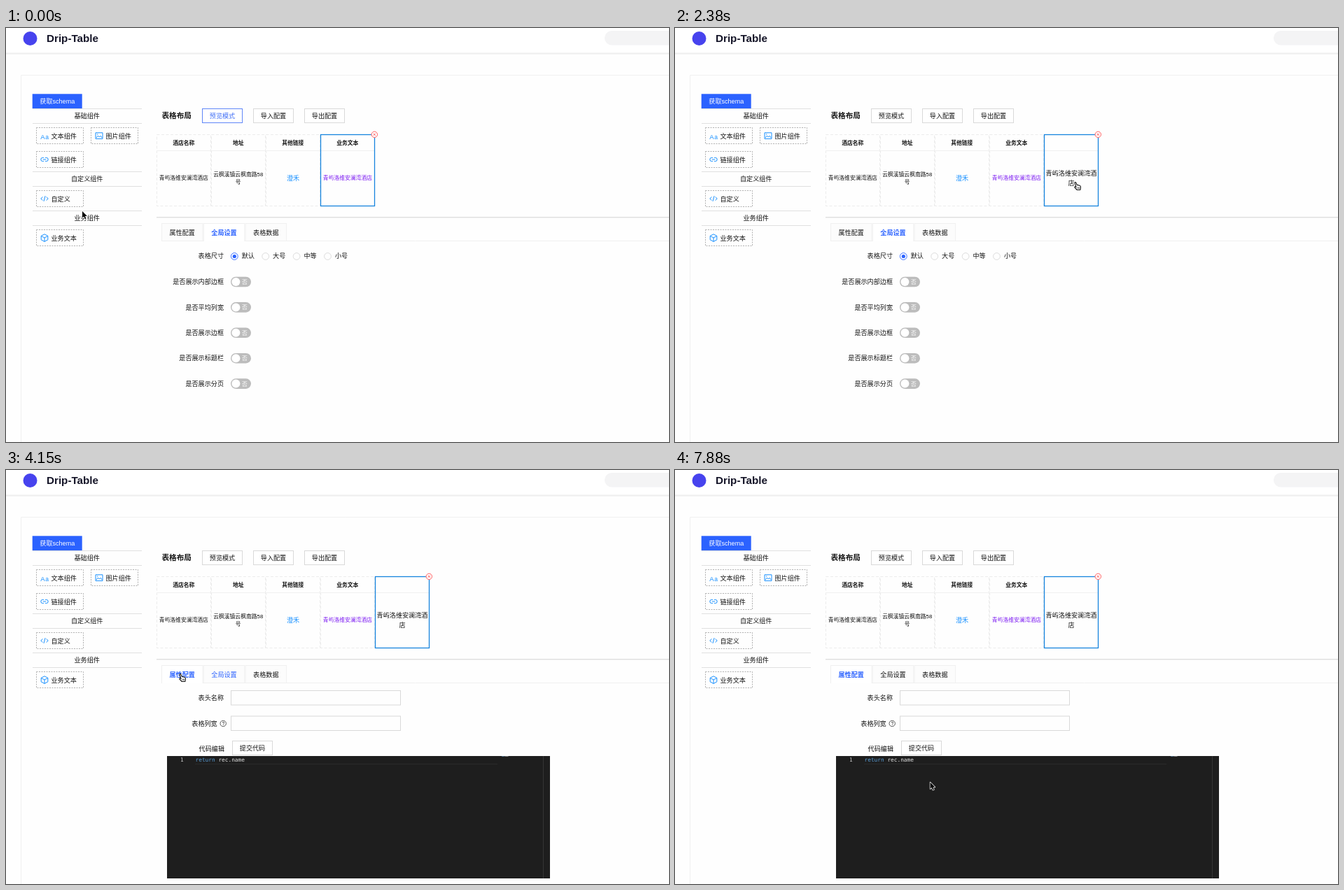
Animation of 947x592 px, one loop 8000 ms. Source, as an HTML page with a canvas:

```html
<!DOCTYPE html>
<html lang="zh-CN">
<head>
<meta charset="utf-8">
<title>Drip-Table</title>
<style>
html, body { margin: 0; width: 100%; height: 100%; overflow: hidden; background: #fff; }
canvas { display: block; width: 947px; height: 592px; }
</style>
</head>
<body>
<canvas id="stage"></canvas>
<script>
const W = 947, H = 592, LOOP = 8000;
const SANS = '"Liberation Sans", "Noto Sans CJK SC", "Noto Sans CJK", sans-serif';
const MONO = '"DejaVu Sans Mono", monospace';
const INK = '#141414', BLUE = '#2b62ff', SKY = '#1890ff', LINE = '#d9d9d9', PALE = '#ececec';
const HOTEL = '青屿洛维安澜湾酒店';

// When the interface changes state
const ADDED = 1040, SELECTED = 2380, HOVER = 4000, SWITCHED = 4150, SETTLED = 4300;

// Pointer stops: time, x, y, kind
const pointer = [
  [0, 109, 262, 'arrow'], [150, 86, 242, 'hand'],
  [1040, 106, 245, 'hand'], [1190, 235, 246, 'arrow'], [1330, 430, 240, 'hand'],
  [1480, 592, 230, 'hand'], [1630, 652, 225, 'arrow'], [1780, 570, 220, 'hand'],
  [2830, 546, 258, 'arrow'], [2980, 474, 322, 'arrow'], [3120, 407.5, 353.5, 'arrow'],
  [3270, 372, 349, 'arrow'], [3410, 334, 336, 'arrow'], [3560, 296, 317, 'arrow'],
  [3710, 264, 300, 'arrow'], [3860, 245, 292, 'hand'], [4000, 247, 291, 'hand'],
  [4300, 275, 332, 'arrow'], [4440, 334, 440, 'arrow'], [4590, 0, 0, 'none'],
  [7290, 349.5, 477.5, 'arrow'], [7590, 353, 470, 'arrow'],
  [7740, 361, 456, 'arrow'], [7880, 364.5, 446.5, 'arrow']
];
const arrow = new Path2D('M0 0V9.6L2.2 7.6 3.8 11.2 5.4 10.5 3.9 7H6.9Z');
const hand = new Path2D('M1 1.6C.8 .6 2.2 .1 2.7 1L4.3 4.4 8 5.2C9.3 5.6 9.6 6.6 9.4 8L8.9 11.5H4.2L1 8.2C.2 7.2 1.4 6.3 2.2 7L3 7.6Z');

const canvas = document.getElementById('stage');
const c = canvas.getContext('2d');
const dpr = window.devicePixelRatio || 1;
canvas.width = W * dpr;
canvas.height = H * dpr;

// Text is placed by its vertical middle
function text(s, x, y, { size = 9.1, color = INK, bold = false, align = 'center', font = SANS } = {}) {
  c.font = `${bold ? 'bold ' : ''}${size}px ${font}`;
  c.textAlign = align;
  c.fillStyle = color;
  c.fillText(s, x, y + size * 0.38);
}

function fill(x, y, w, h, color) {
  c.fillStyle = color;
  c.fillRect(x, y, w, h);
}

function box(x, y, w, h, color, dash = [], width = 1) {
  c.setLineDash(dash);
  c.lineWidth = width;
  c.strokeStyle = color;
  c.strokeRect(x, y, w, h);
  c.setLineDash([]);
}

function line(x1, y1, x2, y2, color, width = 1) {
  c.lineWidth = width;
  c.strokeStyle = color;
  c.beginPath();
  c.moveTo(x1, y1);
  c.lineTo(x2, y2);
  c.stroke();
}

function disc(x, y, r, color, ring) {
  c.beginPath();
  c.arc(x, y, r, 0, Math.PI * 2);
  if (ring) {
    c.lineWidth = ring;
    c.strokeStyle = color;
    c.stroke();
  } else {
    c.fillStyle = color;
    c.fill();
  }
}

function pill(x, y, w, h, color) {
  c.beginPath();
  c.roundRect(x, y, w, h, h / 2);
  c.fillStyle = color;
  c.fill();
}

function shape(d, x, y) {
  c.save();
  c.translate(x, y);
  c.lineWidth = 1;
  c.strokeStyle = SKY;
  c.stroke(new Path2D(d));
  c.restore();
}

function button(label, x, y, on) {
  fill(x, y, 57, 20, '#fff');
  box(x, y, 57, 20, on ? '#5f86f8' : LINE);
  text(label, x + 28.5, y + 10, { color: on ? '#3f6ef6' : INK });
}

function header() {
  fill(0, 0, W, 36, '#fff');
  fill(0, 35, W, 1, '#f5f5f5');
  fill(0, 36, W, 1, '#eeeeee');
  fill(0, 37, W, 1, '#f6f6f6');
  disc(34.5, 15, 10, '#4743ee');
  text('Drip-Table', 58, 14.5, { size: 15.2, bold: true, color: '#151528', align: 'left' });
  pill(855, 4, 120, 20.5, '#f4f4f5');
  line(21.5, 67.5, W, 67.5, '#f0f0f0');
  line(21.5, 67.5, 21.5, H, '#f0f0f0');
}

function part(label, x, y, icon) {
  box(x + 0.5, y - 11.5, 67, 23, '#b0b0b0', [2, 1.5]);
  text(label, x + 21.5, y + 0.3, { align: 'left' });
  if (icon) shape(icon, x + 6, y - 6);
}

function sidebar() {
  fill(37.7, 94.3, 71, 20.9, BLUE);
  text('获取schema', 73.3, 104.5, { color: '#fff' });
  for (const y of [115.5, 136.5, 205.5, 226.5, 261.5, 282.5]) line(38, y, 194, y, '#e0e0e0');
  text('基础组件', 115.7, 126);
  text('自定义组件', 115.7, 216);
  text('业务组件', 115.7, 272);
  part('文本组件', 43, 154);
  text('A', 52.5, 155, { size: 9.5, color: SKY });
  text('a', 58.7, 156, { size: 8.5, color: SKY });
  part('图片组件', 121, 154, 'M1 1.8H11V10.4H1ZM2 9 4.5 6 6.3 8 8 6.2 10.3 9M3 4H4.4');
  part('链接组件', 43, 188, 'M5 3.4H3.4A2.6 2.6 0 0 0 3.4 8.6H5M7 3.4H8.6A2.6 2.6 0 0 1 8.6 8.6H7M3.8 6H8.2');
  part('自定义', 43, 244, 'M3.3 3.4 .8 6 3.3 8.6M8.7 3.4 11.2 6 8.7 8.6M7 2.2 5 9.8');
  part('业务文本', 43, 300, 'M6 .8 10.8 3.4V8.8L6 11.4 1.2 8.8V3.4ZM1.2 3.4 6 6 10.8 3.4M6 6V11.4');
}

function table(t) {
  text('表格布局', 222.5, 125.3, { size: 10.6, bold: true, align: 'left' });
  button('预览模式', 280.5, 115.5, t < ADDED);
  button('导入配置', 353.5, 115.5);
  button('导出配置', 426.5, 115.5);

  ['酒店名称', '地址', '其他链接', '业务文本'].forEach((name, i) => {
    const x = 215 + i * 78;
    box(x + 0.5, 152.5, 77, 102, PALE, [4, 2.5]);
    line(x, 175.5, x + 78, 175.5, '#f0f0f0');
    text(name, x + 38.8, 163.8, { size: 7.8, bold: true });
  });
  const small = { size: 7.8 };
  text(HOTEL, 253.8, 214.5, small);
  text('云枫溪镇云枫南路58', 331.7, 208.8, small);
  text('号', 331.7, 220.3, small);
  text('澄禾', 410, 214.5, { color: SKY });
  text(HOTEL, 487.9, 214.5, { size: 7.8, color: '#7d1cf2' });

  if (t >= ADDED) {
    box(527.5, 152.5, 77, 102, PALE);
    line(527, 175.5, 604, 175.5, '#f0f0f0');
    text(HOTEL.slice(0, 8), 566, 208);
    text(HOTEL.slice(8), 566, 222);
  }
  const x = t < SELECTED ? 449 : 527;
  box(x + 0.5, 152.5, 77, 102, '#1684de', [], 1.3);
  disc(x + 77.3, 152.3, 4.4, '#fff');
  disc(x + 77.3, 152.3, 4.2, '#ff4d4f', 0.9);
  line(x + 75.7, 150.7, x + 78.9, 153.9, '#ff4d4f', 0.9);
  line(x + 78.9, 150.7, x + 75.7, 153.9, '#ff4d4f', 0.9);
}

function tabs(t) {
  fill(215, 270, W - 215, 1, '#e0e0e0');
  fill(215, 271, W - 215, 1, '#f0f0f0');
  line(222, 304.5, W, 304.5, '#f0f0f0');
  const active = t < SWITCHED ? 1 : 0;
  ['属性配置', '全局设置', '表格数据'].forEach((name, i) => {
    const x = 222.5 + i * 59.8, on = i === active;
    const lit = on || (i === 0 && t >= HOVER) || (i === 1 && t < SETTLED);
    fill(x, 279.5, 58.5, 25, on ? '#fff' : '#fcfcfc');
    box(x, 279.5, 58.5, 25, '#f0f0f0');
    if (on) fill(x + 0.5, 304, 57.5, 1, '#fff');
    text(name, x + 29.2, 292.2, { color: lit ? BLUE : INK, bold: on });
  });
}

function label(s, y, x = 311) {
  text(s, x, y, { align: 'right' });
}

function globalForm() {
  label('表格尺寸', 326);
  ['默认', '大号', '中等', '小号'].forEach((name, i) => {
    const x = 326.3 + i * 44.4;
    disc(x, 326.5, 4.9, i ? LINE : BLUE, 0.9);
    if (!i) disc(x, 326.5, 2.6, BLUE);
    text(name, x + 10.4, 326, { align: 'left' });
  });
  ['是否展示内部边框', '是否平均列宽', '是否展示边框', '是否展示标题栏', '是否展示分页'].forEach((name, i) => {
    const y = 363 + i * 36.4;
    label(name, y - 0.3);
    pill(321, y - 7.3, 29, 14.6, '#bcbcbc');
    disc(328.4, y, 6, '#fff');
    text('否', 341, y, { size: 7.8, color: '#fff' });
  });
}

function columnForm() {
  label('表头名称', 326);
  box(321.5, 315.5, 242, 20.5, LINE);
  label('表格列宽', 362.5, 301.7);
  disc(310.2, 362.5, 4.2, '#333', 0.8);
  text('?', 310.2, 362.5, { size: 6.5 });
  box(321.5, 352, 242, 20.5, LINE);
  label('代码编辑', 398.5, 312);
  button('提交代码', 323.5, 387.5);

  fill(230, 409, 547, 175, '#1e1e1e');
  line(270, 420.5, 702, 420.5, '#2b2b2b');
  line(767.5, 409, 767.5, 584, '#343434');
  fill(708, 409, 4, 1, '#4a6a84');
  fill(712.5, 409, 5, 1, '#777');
  const code = { size: 7.8, font: MONO, align: 'left' };
  text('1', 249, 414.3, { ...code, color: '#c6c6c6' });
  text('return', 270.5, 414.3, { ...code, color: '#569cd6' });
  text('rec.name', 303.4, 414.3, { ...code, color: '#e4e4e4' });
}

function drawPointer(t) {
  const [, x, y, kind] = pointer.findLast(p => p[0] <= t);
  if (kind === 'none') return;
  const isArrow = kind === 'arrow', path = isArrow ? arrow : hand;
  c.save();
  c.translate(x, y);
  c.lineJoin = 'round';
  c.lineWidth = isArrow ? 1.4 : 1.1;
  c.strokeStyle = isArrow ? '#fff' : '#111';
  c.fillStyle = isArrow ? '#000' : '#fff';
  if (isArrow) c.stroke(path);
  c.fill(path);
  if (!isArrow) {
    c.stroke(path);
    c.lineWidth = 0.6;
    c.stroke(new Path2D('M5 7.6V10M6.4 7.6V10M7.8 7.6V10'));
  }
  c.restore();
}

function draw(t) {
  c.setTransform(dpr, 0, 0, dpr, 0, 0);
  fill(0, 0, W, H, '#fefefe');
  header();
  sidebar();
  table(t);
  tabs(t);
  if (t < SWITCHED) globalForm();
  else columnForm();
  drawPointer(t);
}

const start = performance.now();
function tick() {
  draw((performance.now() - start) % LOOP);
  requestAnimationFrame(tick);
}
tick();
</script>
</body>
</html>
```
